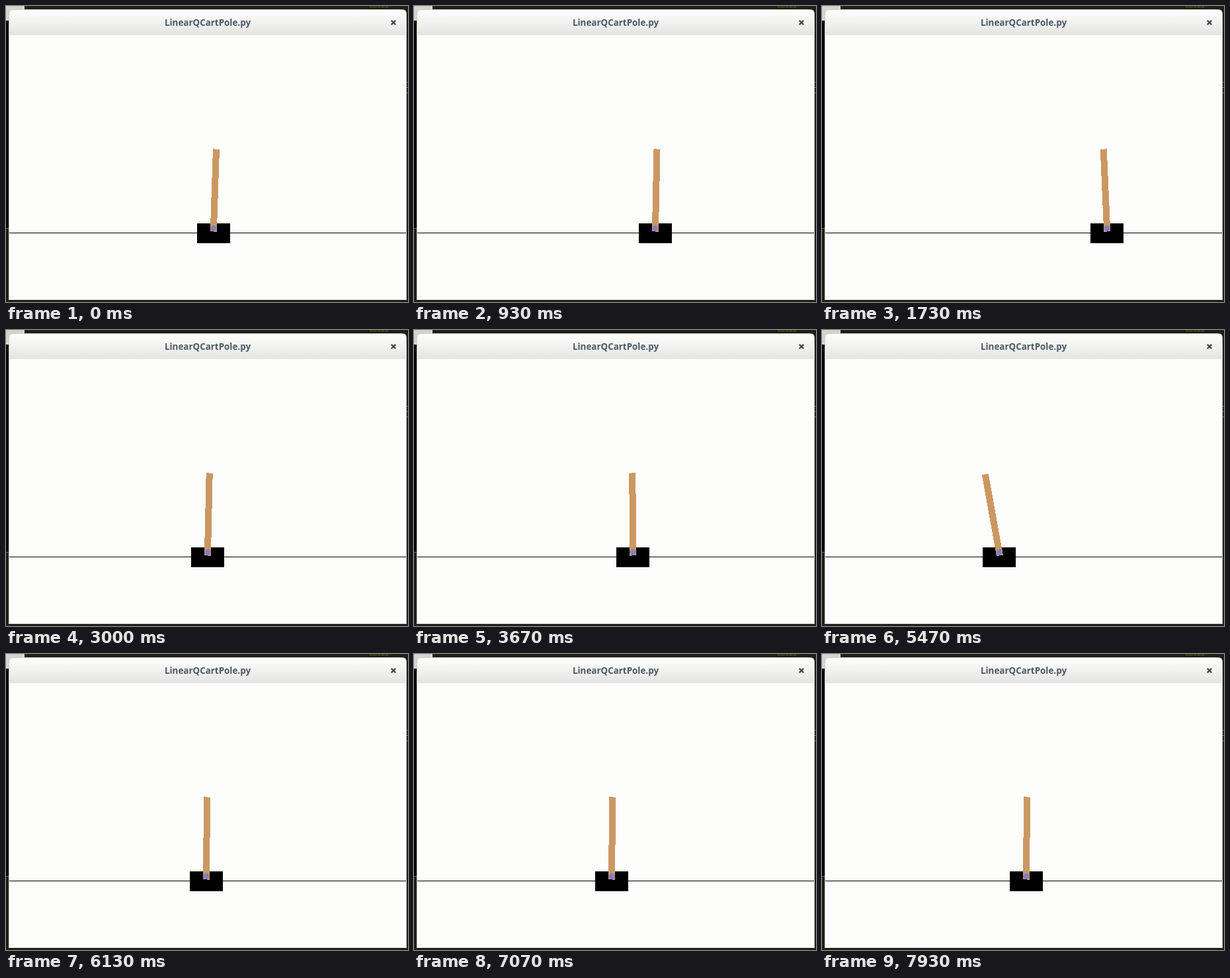
Animation, 608 px wide and 448 px high, one loop 8 s. Source, as an HTML page:

```html
<!DOCTYPE html>
<html lang="en">
<head>
<meta charset="utf-8">
<title>LinearQCartPole.py</title>
<style>
  html, body { margin: 0; width: 100%; height: 100%; overflow: hidden; background: #1f1e17; }
  svg { display: block; width: 608px; height: 448px; }
  .title { font: 700 13.4px "Open Sans", "Noto Sans", sans-serif; fill: #4b5b66; text-anchor: middle; }
</style>
</head>
<body>
<svg viewBox="0 0 608 448">
  <defs>
    <linearGradient id="bar" x1="0" y1="0" x2="0" y2="1">
      <stop offset="0" stop-color="#fdfdfc"/>
      <stop offset=".45" stop-color="#f3f3f2"/>
      <stop offset="1" stop-color="#e3e3e2"/>
    </linearGradient>
  </defs>

  <!-- desktop behind the window -->
  <rect width="608" height="448" fill="#1f1e17"/>
  <rect y="22" width="5" height="314" fill="#000"/>
  <path d="M0 0H28V8H5V22H0Z" fill="#d3d3cf"/>
  <path d="M0 336.5H4M606 115.5h2M606 123.5h2M606 131.5h2" stroke="#77724a"/>
  <path d="M550 1.5h28" stroke="#6b6210" stroke-dasharray="4 1 6 1"/>

  <!-- window -->
  <path d="M4 445V12Q4 5 11 5H599Q606 5 606 12V445Z" fill="#d4d4c8"/>
  <path d="M5 44V12Q5 6 11 6H599Q605 6 605 12V44Z" fill="url(#bar)"/>
  <rect x="5" y="44" width="600" height="400" fill="#fdfdfc"/>
  <text class="title" x="305" y="30">LinearQCartPole.py</text>
  <path d="M582.7 21.7l6.6 6.6m0-6.6l-6.6 6.6" stroke="#3a444b" stroke-width="2.2"/>

  <!-- track, cart, pole, axle -->
  <g shape-rendering="crispEdges">
    <rect x="5" y="343" width="600" height="1" fill="#000"/>
    <g id="cart">
      <rect x="-25" y="329" width="50" height="30" fill="#000"/>
      <rect id="pole" x="-5" y="216.5" width="10" height="125" fill="#cb9862"/>
      <circle cy="336.5" r="4.5" fill="#8080c8"/>
    </g>
  </g>
</svg>
<script>
  const LOOP = 8000, STEP = 1000 / 15, TAU = 2 * Math.PI;
  const cart = document.getElementById("cart");
  const pole = document.getElementById("pole");

  const cubic = (n, start, a, b, c) => start + n * (a + n * (b + n * c));

  // Each episode gives the cart centre and the pole lean (degrees) n steps after its reset
  const episodes = [
    { // drifts right while the pole tips left
      from: 0,
      x: n => cubic(n, 314, 1.182, 0.2319, -0.00401),
      lean: n => 1.9 - 4.4 * (n / 26) ** 3
    },
    { // drifts right, then is pushed left after step 34
      from: 32,
      x: n => cubic(n, 303, -1.391, 0.1269, -0.00062) - 0.8 * Math.max(0, n - 34) ** 2,
      lean: n => -4.6 + 5.9 * Math.cos((n - 13) * 0.076)
    },
    { // balances around the middle
      from: 92,
      x: n => 303.4 + 6.5 * Math.sin(TAU * n / 23),
      lean: n => 0.5 - Math.sin(TAU * n / 27)
    }
  ];

  function draw(now) {
    const t = Math.floor((now % LOOP) / 10) * 10;
    const step = Math.floor((t + 5) / STEP);
    const k = step < 2 ? 0 : Math.min(119, step);
    const run = episodes.filter(e => e.from <= k).pop();
    const n = k - run.from;
    cart.setAttribute("transform", `translate(${Math.round(run.x(n))} 0)`);
    pole.setAttribute("transform", `rotate(${run.lean(n).toFixed(2)} 0 336.5)`);
  }

  const start = performance.now();
  function tick() {
    draw(performance.now() - start);
    requestAnimationFrame(tick);
  }
  tick();
</script>
</body>
</html>
```
